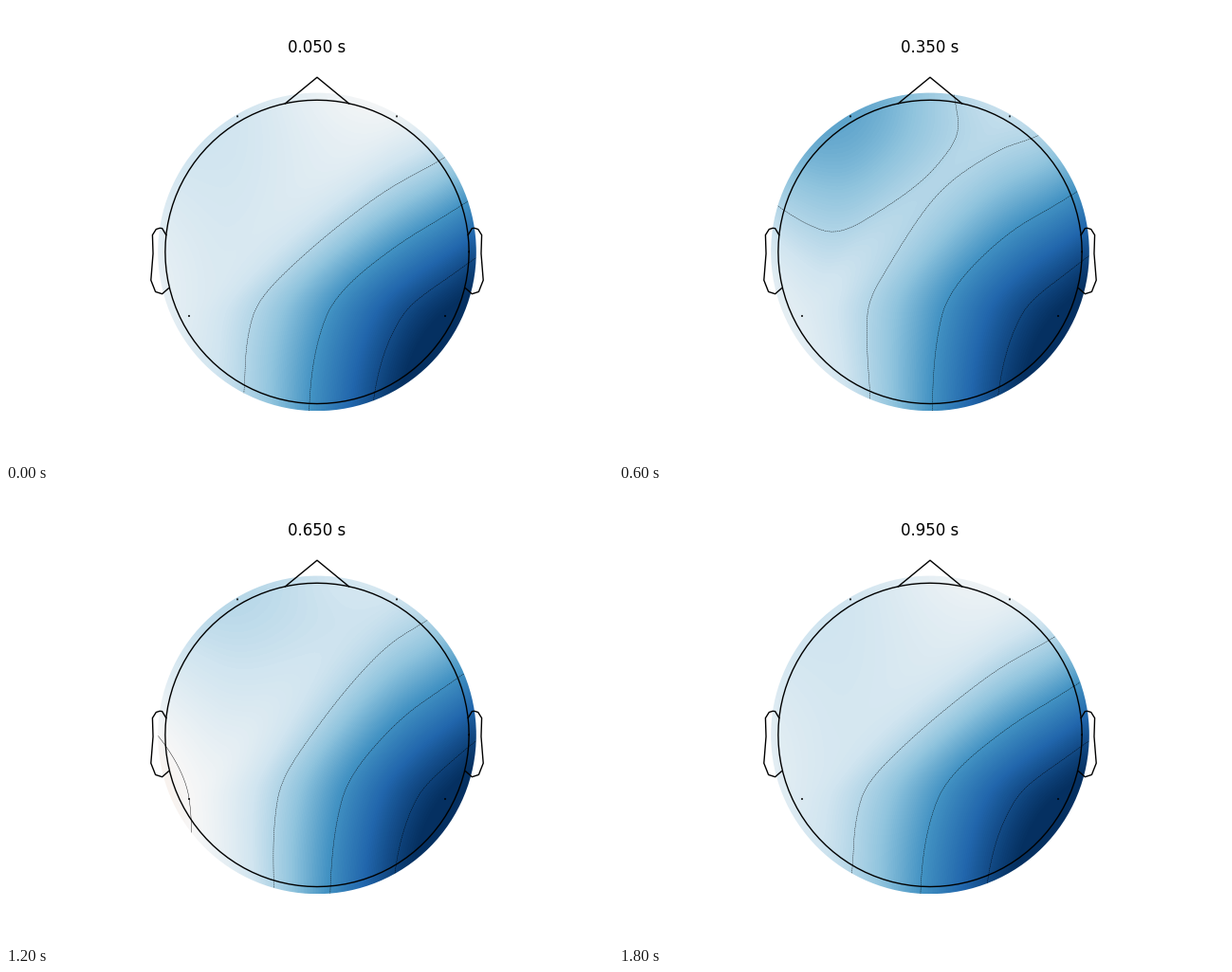
Animation, 640 px wide and 480 px high, one loop 2000 ms. Source, as a matplotlib script:

```python
import numpy as np
import matplotlib.pyplot as plt
from matplotlib.animation import ArtistAnimation
from matplotlib.patches import Circle
from matplotlib.tri import Triangulation

W, H, DPI = 640, 480, 100
CX, CY = 328, 259.4          # head centre, pixels from the top left
HEAD, CLIP = 160.15, 167.8   # head outline and scalp map radii
RES, STEPS = 64, 10

# Sensors: front left, front right, back left, back right
SENSORS = np.array([(-84, 143), (84, 143), (-135, -67.6), (135, -67.6)])

# Sensor values at key time steps, in units of the isoline spacing
KEYS = {
    0: (-.64, -.18, -.43, -3.38),
    1: (1.2, .46, -.41, -3.09),
    3: (-1.73, -.8, -.41, -3.31),
    4: (.95, .35, -.42, -3.36),
    6: (-.9, -.68, 0, -3.25),
    7: (-.45, -.25, -1, 2.98),
    8: (-.6, -.25, -.6, -3.3),
    9: (-.64, -.28, -.5, -3.36),
}


class ScalpBasis:
    """Clough-Tocher interpolation, one basis function per sensor."""

    def __init__(self, sensors, ring_radius, n_ring=12):
        n = len(sensors)
        angle = np.arange(n_ring) * 2 * np.pi / n_ring
        ring = ring_radius * np.column_stack([np.cos(angle), np.sin(angle)])
        # The tiny inward shift settles which diagonal joins the sensors
        inner = sensors * np.array([1, .999, .999, 1])[:, None]
        self.pts = np.vstack([inner, ring])
        tri = Triangulation(*self.pts.T)
        self.tris, self.edges = tri.triangles, tri.edges
        self.find = tri.get_trifinder()
        self.f = self.vertex_values(n)
        self.grad = self.gradients()
        self.skew = self.edge_skew(tri.neighbors)

    def vertex_values(self, n):
        """Ring points take the mean of the sensors next to them."""
        f = np.zeros((len(self.pts), n))
        f[:n] = np.eye(n)
        for p in range(n, len(f)):
            near = self.edges[(self.edges == p).any(axis=1)].ravel()
            f[p] = f[near[near < n]].mean(axis=0)
        return f

    def gradients(self):
        """Vertex gradients that minimise the bending along all edges."""
        n = len(self.pts)
        mat = np.zeros((n, 2, n, 2))
        rhs = np.zeros((n, 2, self.f.shape[1]))
        for i, k in np.vstack([self.edges, self.edges[:, ::-1]]):
            e = self.pts[k] - self.pts[i]
            w = np.hypot(*e) ** -3
            mat[i, :, i] += 4 * w * np.outer(e, e)
            mat[i, :, k] += 2 * w * np.outer(e, e)
            rhs[i] += 6 * w * np.outer(e, self.f[k] - self.f[i])
        sol = np.linalg.solve(mat.reshape(2 * n, 2 * n),
                              rhs.reshape(2 * n, -1))
        return sol.reshape(n, 2, -1)

    def barycentric(self, t, q):
        p = self.pts[self.tris[t]]
        m = np.stack([p[:, 0] - p[:, 2], p[:, 1] - p[:, 2]], axis=-1)
        ab = np.linalg.solve(m, (q - p[:, 2])[..., None])[..., 0]
        return np.column_stack([ab, 1 - ab.sum(axis=1)])

    def edge_skew(self, neighbors):
        g = np.full(self.tris.shape, -.5)
        centroid = self.pts[self.tris].mean(axis=1)
        for k in range(3):
            j, l = (k + 1) % 3, (k + 2) % 3
            t = np.flatnonzero(neighbors[:, j] >= 0)
            c = self.barycentric(t, centroid[neighbors[t, j]])
            g[t, k] = ((2 * c[:, l] + c[:, j] - 1)
                       / (2 - 3 * c[:, l] - 3 * c[:, j]))
        return g

    def __call__(self, x, y):
        t = self.find(x, y)
        v = self.tris[t]
        bary = self.barycentric(t, np.column_stack([x, y]))
        low = bary.min(axis=1, keepdims=True)
        b = [bary[:, [i]] - low for i in range(3)]
        b4 = 3 * low
        f = [self.f[v[:, i]] for i in range(3)]
        turns = [(i, (i + 1) % 3, (i + 2) % 3) for i in range(3)]

        def near(i, j):
            step = self.pts[v[:, j]] - self.pts[v[:, i]]
            return f[i] + np.einsum('nd,ndc->nc', step, self.grad[v[:, i]]) / 3

        # Control points: near the corners, on the sides, round the centre
        c = {(i, j): near(i, j) for i in range(3) for j in range(3) if i != j}
        mid = [(f[i] + c[i, j] + c[i, l]) / 3 for i, j, l in turns]
        side = [(self.skew[t, k][:, None]
                 * (f[l] - f[j] + 3 * (c[j, l] - c[l, j]))
                 - f[j] + 2 * c[j, l] - c[l, j] + mid[j] + mid[l]) / 2
                for k, j, l in turns]
        core = [(mid[i] + side[j] + side[l]) / 3 for i, j, l in turns]

        out = b4 ** 3 * sum(core) / 3
        for i, j, l in turns:
            out += b[i] ** 3 * f[i] + 3 * b[i] * b4 ** 2 * core[i]
            out += 3 * b[i] ** 2 * (b[j] * c[i, j] + b[l] * c[i, l]
                                    + b4 * mid[i])
            out += 6 * b[j] * b[l] * b4 * side[i]
        return out


def draw_head(ax):
    a = np.linspace(0, 2 * np.pi, 101)
    dx = np.deg2rad(12)
    dy = np.sqrt(1 - dx ** 2)
    ear_x = np.array([.497, .510, .518, .5299, .5419, .54, .547, .532,
                      .510, .489]) * 2
    ear_y = np.array([.0555, .0775, .0783, .0746, .0555, -.0055, -.0932,
                      -.1313, -.1384, -.1199]) * 2
    for x, y in [(np.cos(a), np.sin(a)),
                 (np.array([-dx, 0, dx]), np.array([dy, 1.15, dy])),
                 (ear_x, ear_y), (-ear_x, ear_y)]:
        ax.plot(x * HEAD, y * HEAD, color='k', lw=1, zorder=3)
    ax.scatter(*SENSORS.T, s=.25, marker='o', edgecolor='k',
               facecolor='none', zorder=4)


def draw_step(ax, i, values):
    """Scalp map, isolines and time label of one step."""
    z = (phi @ values).reshape(RES, RES)
    top = abs(values).max()
    image = ax.imshow(z, cmap='RdBu_r', vmin=-top, vmax=top, origin='lower',
                      extent=(-CLIP, CLIP, -CLIP, CLIP), aspect='auto',
                      interpolation='bilinear', zorder=1)
    lines = ax.contour(gx, gy, z, levels=np.arange(-4, 5), colors='k',
                       linewidths=.3, zorder=2)
    for artist in (image, lines):
        artist.set_clip_path(clip)
    label = ax.text(0, CY - 49.27, f'{0.05 + 0.1 * i:.3f} s', fontsize=12,
                    family='DejaVu Sans', ha='center', va='baseline')
    return [image, lines, label]


fig = plt.figure(figsize=(W / DPI, H / DPI), dpi=DPI, facecolor='white')
ax = fig.add_axes([0, 0, 1, 1])
ax.axis('off')
draw_head(ax)
clip = Circle((0, 0), CLIP, transform=ax.transData)

axis = np.linspace(-CLIP, CLIP, RES)
gx, gy = np.meshgrid(axis, axis)
phi = ScalpBasis(SENSORS, CLIP * 1.1 + 245)(gx.ravel(), gy.ravel())

# Steps between the keys are blended linearly
tracks = zip(*KEYS.values())
signal = np.column_stack([np.interp(range(STEPS), list(KEYS), track)
                          for track in tracks])
frames = [draw_step(ax, i, values) for i, values in enumerate(signal)]

ax.set_xlim(-CX, W - CX)
ax.set_ylim(CY - H, CY)

anim = ArtistAnimation(fig, frames, interval=200, repeat=True, repeat_delay=0)
plt.show()
```
